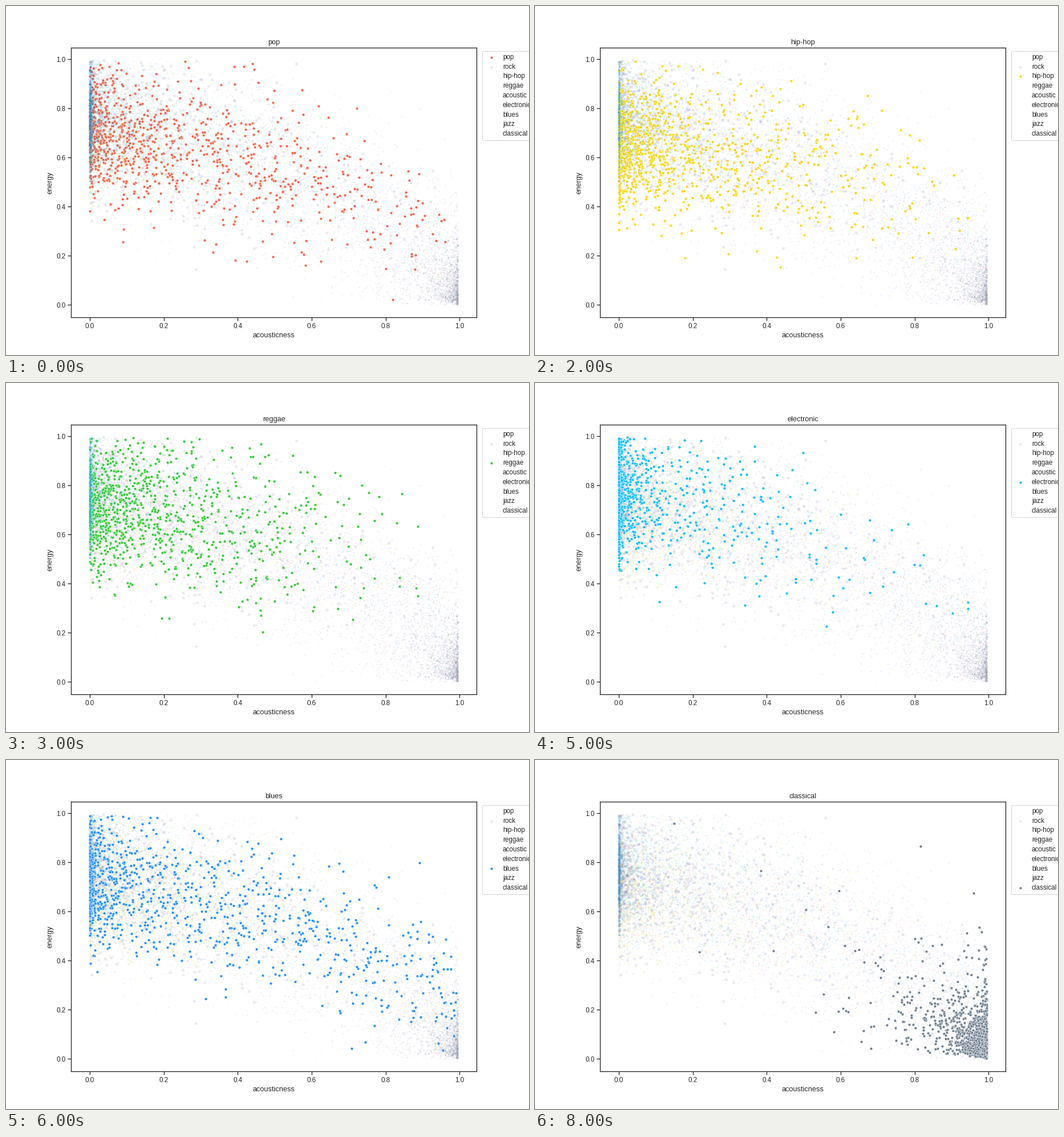
Recreate the animation shown at these times as a matplotlib script. Size 917 by 611 pixels, loop 9 s.

```python
import numpy as np
import matplotlib.pyplot as plt
from matplotlib.animation import FuncAnimation

W, H, DPI = 917, 611, 76.4
INK = "0.15"
COUNT = 1000
BIG, SMALL = 20, 4
TOP = 0.995

plt.rcParams.update({
    "font.family": "Liberation Sans",
    "text.color": INK,
    "axes.labelcolor": INK,
    "axes.edgecolor": INK,
    "axes.linewidth": 1.25,
    "axes.labelsize": 12,
    "axes.titlesize": 12,
    "legend.fontsize": 11,
})
for axis in ("xtick", "ytick"):
    plt.rcParams.update({
        f"{axis}.color": INK,
        f"{axis}.labelsize": 11,
        f"{axis}.major.size": 6,
        f"{axis}.major.width": 1.25,
    })

rng = np.random.default_rng(12)


def cloud(a, b, start, slope):
    """Beta-distributed acousticness with energy falling along it."""
    x = TOP * rng.beta(a, b, COUNT)
    spread = 0.145 * (0.85 + x - 1.1 * x**2)
    y = start - slope * x - 0.2 * x**4 + spread * rng.standard_normal(COUNT)
    return x, y


def corner():
    """Points crowding the quiet, fully acoustic corner."""
    gap = 0.045 * rng.weibull(0.7, COUNT)
    y = rng.exponential(0.085, COUNT) + 1.2 * gap * rng.random(COUNT)
    return TOP - gap, y


def fold(x, y):
    """Reflect energy back into its valid range."""
    return x, np.abs(TOP - np.abs(TOP - y))


GENRES = {
    "pop": ("tomato", cloud(0.5, 1.6, 0.70, 0.28)),
    "rock": ("darkslateblue", cloud(0.3, 1.5, 0.75, 0.33)),
    "hip-hop": ("gold", cloud(0.5, 2.0, 0.65, 0.12)),
    "reggae": ("limegreen", cloud(0.6, 2.6, 0.71, 0.15)),
    "acoustic": ("steelblue", cloud(0.75, 0.58, 0.72, 0.40)),
    "electronic": ("deepskyblue", cloud(0.16, 2.0, 0.77, 0.30)),
    "blues": ("dodgerblue", cloud(0.4, 1.1, 0.74, 0.32)),
    "jazz": ("plum", cloud(2.0, 0.5, 0.65, 0.38)),
    "classical": ("slategray", corner()),
}


def style(dots, name, active):
    if active:
        size, alpha, edge = BIG, 1, 0.45
    elif name == "rock":
        size, alpha, edge = BIG, 0.11, 0
    else:
        size, alpha, edge = SMALL, 0.18, 0
    dots.set_sizes([size])
    dots.set_alpha(alpha)
    dots.set_linewidth(edge)


fig, ax = plt.subplots(figsize=((W + 0.01) / DPI, (H + 0.01) / DPI), dpi=DPI)
fig.subplots_adjust(left=114.4 / W, right=0.9, bottom=66.4 / H, top=0.88)
ax.set(xlim=(-0.05, 1.046), ylim=(-0.05, 1.046),
       xlabel="acousticness", ylabel="energy")

names = list(GENRES)
layers = [
    ax.scatter(*fold(*points), s=BIG, color=color, edgecolors="white", label=name)
    for name, (color, points) in GENRES.items()
]
legend = ax.legend(loc="upper left", bbox_to_anchor=(1.005, 1),
                   handletextpad=0.7, labelspacing=0.41)
keys = legend.legend_handles


def update(i):
    ax.set_title(names[i])
    for j, name in enumerate(names):
        style(layers[j], name, i == j)
        style(keys[j], name, i == j)
        keys[j].set_visible(i == j or name == "rock")


anim = FuncAnimation(fig, update, frames=len(names), interval=1000,
                     repeat=True, repeat_delay=0, blit=False)
plt.show()
```
